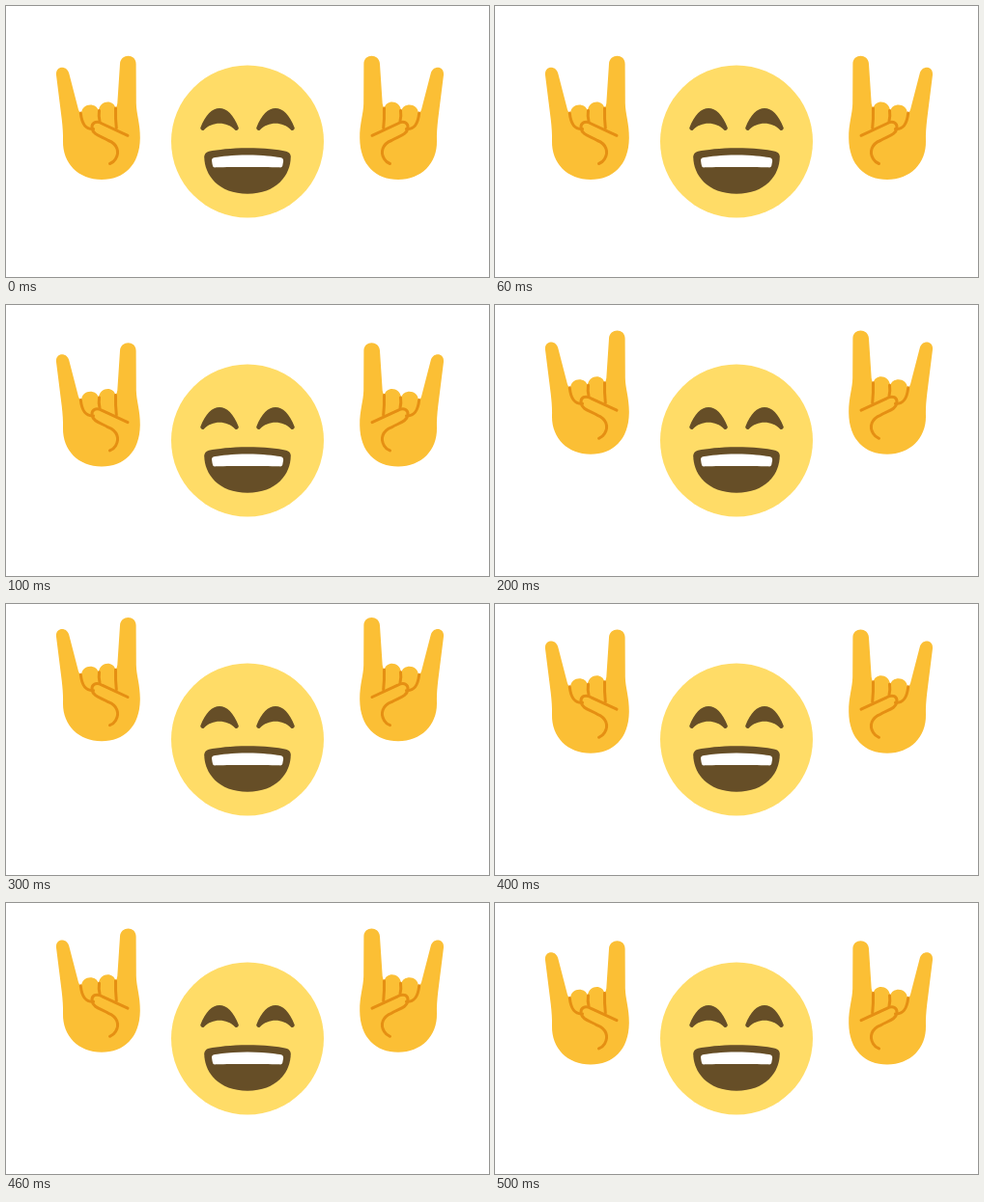
These frames come from a looping animation (500 px wide and 281 px high, 600 ms). An HTML page:

```html
<!DOCTYPE html>
<html lang="en">
<head>
<meta charset="utf-8">
<title>Rock on</title>
<style>
html, body { margin: 0; width: 100%; height: 100%; overflow: hidden; background: #fff; }
svg { display: block; width: 100%; height: 100%; }
</style>
</head>
<body>
<svg viewBox="0 0 500 281">
  <defs>
    <g id="hand">
      <path fill="#fbbf35" d="M52 71.500C51 62 63 61 65.300 70L75 107.500Q76 111 78 111.500C78.500 100.500 93 99.500 96 108.500C97 97 112 97 113.300 106Q115 104 115.300 101L118 60C118.500 49 134.600 49 134.600 60L134.800 101C135 112 139 122 138.800 137C138.500 165 122 180 99 180C75 180 58.500 163 59 140C59.200 132 58.700 126 57.700 117Z"/>
      <g fill="none" stroke="#e58f13" stroke-width="3" stroke-linecap="round">
        <path d="M77.300 111C78.500 122 82 128 90.500 127.500"/>
        <path d="M96.500 108.500Q95.700 114 97 119.500"/>
        <path d="M113.500 106Q113.200 117 114.300 126.500"/>
        <path d="M126 134.300L99.500 122C93 118.500 88.500 121 89 126.500C90 134 99 135 106 139.500C115 143 118 151 113.500 158.500Q111.500 162 107.500 163.500"/>
      </g>
    </g>
    <path id="eye" d="M28.500 26.600c-1.900-5.100-4.700-7.700-7.500-7.700s-5.600 2.600-7.500 7.700c-.2.5.8 1.400 1.300.9 1.800-1.800 4-2.600 6.200-2.600s4.400.8 6.200 2.600c.6.5 1.500-.4 1.300-.9"/>
  </defs>
  <g transform="translate(250 140.500) scale(2.633) translate(-32 -32)" fill="#664e27">
    <circle cx="32" cy="32" r="30" fill="#ffdc67"/>
    <use href="#eye"/>
    <use href="#eye" x="22"/>
    <path d="M49 38c0-.8-.5-1.800-1.800-2.100-3.500-.7-8.600-1.300-15.200-1.300s-11.700.7-15.200 1.300C15.500 36.200 15 37.200 15 38c0 7.300 5.600 14.600 17 14.600S49 45.300 49 38z"/>
    <path fill="#fff" d="M44.700 38.300c-2.200-.4-6.800-1-12.700-1s-10.500.6-12.700 1c-1.300.2-1.400.7-1.300 1.500.1.4.1 1 .3 1.600.1.6.3.9 1.300.8 1.900-.2 23-.2 24.900 0 1 .1 1.100-.2 1.300-.8.1-.6.2-1.100.3-1.600 0-.8-.1-1.300-1.400-1.500z"/>
  </g>
  <g id="hands">
    <use href="#hand"/>
    <use href="#hand" transform="translate(505 0) scale(-1 1)"/>
  </g>
</svg>
<script>
const hands = document.getElementById('hands');
const STEP_MS = 100, STEPS = 6, RISE = 12.6;
const start = performance.now();

// Hands rise three steps, then fall three.
function draw() {
  const step = Math.floor((performance.now() - start) / STEP_MS) % STEPS;
  const height = Math.min(step, STEPS - step) * RISE;
  hands.setAttribute('transform', `translate(0 ${-height})`);
  requestAnimationFrame(draw);
}
draw();
</script>
</body>
</html>
```
